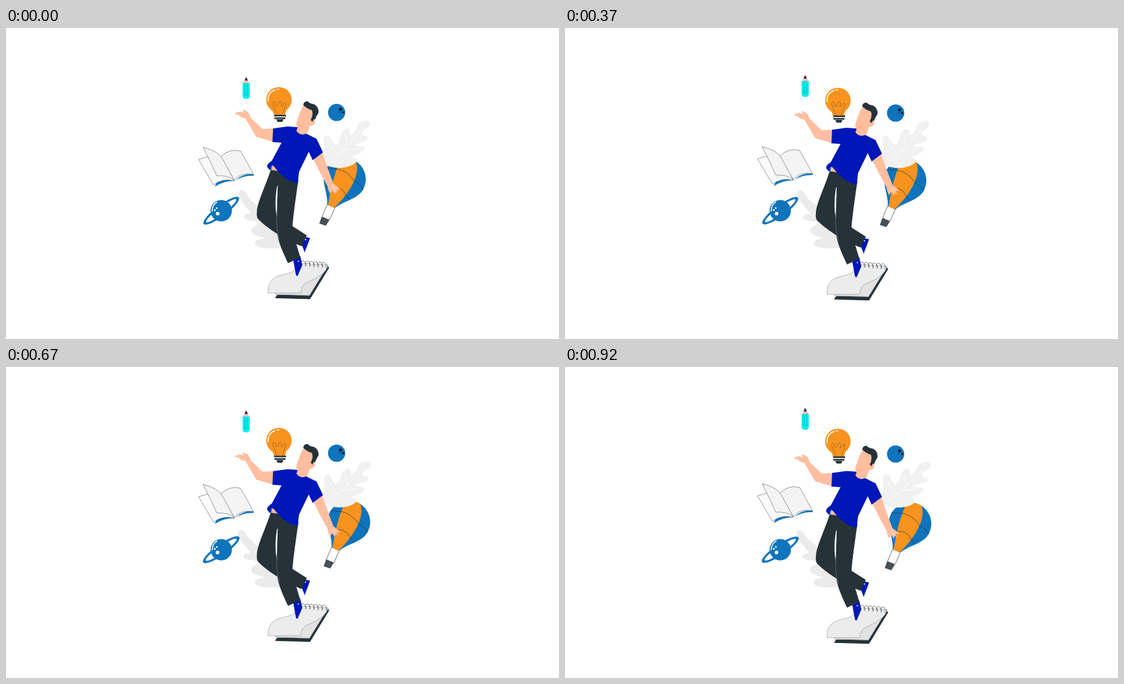
An HTML page that plays this animation: 853 px wide and 480 px high, repeating every 980 ms.

```html
<!DOCTYPE html>
<html lang="en">
<head>
<meta charset="utf-8">
<title>Juggling ideas</title>
<style>
  html, body { margin: 0; width: 100%; height: 100%; overflow: hidden; background: #fff; }
  svg { display: block; width: 100vw; height: 100vh; }
  .ink { fill: #263238; }
  .royal { fill: #0017b8; }
  .blue { fill: #0f74bc; }
  .orange { fill: #f7931e; }
  .skin { fill: #ffbe9f; }
  .leaf { fill: #ebebeb; }
  .pale { fill: #f1f1f1; }
  .page { fill: #f4f4f4; stroke: #555e63; stroke-width: .6; }
  .sheet { fill: #ececec; stroke: #8b9195; stroke-width: .6; }
  .line { fill: none; stroke: #263238; stroke-width: .6; }
  .shine { fill: none; stroke: #fff; stroke-width: 1.5; stroke-linecap: round; }
</style>
</head>
<body>
<svg viewBox="0 0 853 480">
  <g id="balloon"><g transform="translate(522 233.5) rotate(27)">
    <path class="blue" d="M-33 0A33 33 0 0 1 33 0C33 18 13 31 7 46.500L-6 47C-12 31-33 18-33 0Z"/>
    <path class="orange" d="M3-33C18-20 18 12 6 46.500L-4.500 47C-9 30-18 8-19-27A33 33 0 0 1 3-33Z"/>
    <path class="line" d="M-33-2Q-8-18 15-4Q25-5 33 1M-20 24Q0 9 12 20L20 24"/>
    <path class="line" d="M-6 47L-4.500 67M7 46.500L8 66"/>
    <path d="M-5 67L8 66L7 77L-3.500 78.500Z" fill="#455057"/>
  </g></g>

  <g id="bigLeaf">
    <path class="pale" d="M493 209C489 198 491 190 491 181C488 173 490 165 496 166C502 167 502 179 509 180C518 178 514 160 523 156C530 153 532 160 531 165C540 164 539 151 546 146C554 141 563 142 561 149C558 155 550 157 549 163C551 168 559 165 558 170C557 176 545 176 537 181C541 185 554 180 553 186C551 194 538 195 534 199C538 202 544 200 541 206C535 214 516 218 505 215C499 214 495 213 493 209Z"/>
    <path d="M501 207Q527 183 554 150M512 196L498 177M526 181L523 163M518 190L547 185" fill="none" stroke="#fff" stroke-width=".8"/>
  </g>

  <path id="smallLeaf" class="leaf" d="M359 254C361 247 369 251 372 258C376 267 385 269 390 277L425 312V339C406 342 386 339 384 333C383 326 394 326 399 324C389 322 375 317 379 310C382 305 389 305 390 299C380 297 366 297 367 291C369 286 376 288 378 285C372 277 358 265 359 254Z"/>

  <g id="notebook">
    <path class="ink" d="M496 367L498.500 370L469 418.500L415 417L418 412L466 412Z"/>
    <path class="sheet" d="M460 364L497 366L468 413L415 411L418 408Z" style="fill:#e2e2e2"/>
    <path class="sheet" d="M448 367C447 381 424 378 412 387Q404 394 404 409H455Q454 396 468 391Q493 381 497 366L457 363Z"/>
    <path id="rings" class="line"/>
  </g>

  <g id="man">
    <path class="skin" d="M413 155L396 156L377 138Q375 129 370 128L366 126Q364 128 368 131L361 129L354 131Q352 134 359 134Q362 139 369 139L386 168L413 176Z"/>
    <path class="skin" d="M473 200L488 192L496 216L505 240L514 247Q518 251 510 249L513 255L508 252L508 257L503 251L500 256Q496 248 496 244L484 222Z"/>
    <path d="M502 244L508 252M504 243L510 249" fill="none" stroke="#fff" stroke-width=".5"/>
    <path class="royal" d="M456 334L459 322L469 324L461 347Z"/>
    <path d="M469 325L468 332L462 348L461 345Z" fill="#eee"/>
    <path class="royal" d="M442 352H454L457 366L451 380Q449 386 447 380Z"/>
    <path class="ink" d="M409 217C400 245 387 270 387 284Q386 293 390 296C405 311 432 327 456 337L464 320L442 306L418 292C415 280 415 262 418 245L430 228Z"/>
    <path class="ink" d="M410 217L451 234C447 262 443 290 442 305C443 320 450 340 454 354L435 363C427 345 419 330 418 312C417 290 418 255 420 235Z"/>
    <path d="M418.500 248Q415 268 418 288Z" fill="#fff"/>
    <path d="M418 288Q416 310 422 326" fill="none" stroke="#8b9398" stroke-width=".5"/>
    <circle cx="451" cy="360" r="1" fill="#fff"/><circle cx="462" cy="326.500" r="1" fill="#fff"/>
    <path class="blue" d="M408 206Q401 212 406 219L412 220L414 211Z"/>
    <path class="skin" d="M411 212L421 221L409 219Z"/>
    <path class="royal" d="M412 155L434 152L449 153L463 163L479 171L489 192L473 204L467 191L452 222L450 240C440 238 428 231 420 222L412 212Q406 211 409 219Q400 216 404 210L410 205L425 177L411 176Z"/>
    <path class="skin" d="M461 118C455 122 452 136 448 146Q447 151 450 153L448 159Q455 168 465 162L469 151Q475 151 477 145Q478 139 473 141L472 125Z"/>
    <path d="M452 151Q456 153 459 150" fill="none" stroke="#e88f72" stroke-width=".7"/>
    <path class="ink" d="M458.500 119Q459 113 465 113Q469 117 475 117.500Q483 122 482 131Q478 137 477 141Q474 140 473 145L470 142Q474 135 472 127Q465 125 458.500 119Z"/>
  </g>

  <g id="book">
    <path class="blue" d="M322 245L325 238Q342 231 353 236Q335 236 322 245ZM353 236Q365 224 382 225L382 228Q366 227 353 236Z"/>
    <path class="page" d="M297 203L313 198L334 203L352 236Q335 231 320 242Z" style="fill:#fafafa"/>
    <path class="page" d="M331 199Q345 185 362 190L382 226Q362 222 352 235Z"/>
    <path class="page" d="M304 184Q328 190 334 202L352 235Q343 227 325 228Q316 207 304 184Z"/>
  </g>

  <g id="planet">
    <path class="blue" fill-rule="evenodd" transform="translate(332 282) rotate(-37)"
      d="M-34 0A34 8.500 0 0 1 34 0A34 8.500 0 0 1-34 0ZM-29 0A29 5 0 0 0 29 0A29 5 0 0 0-29 0Z"/>
    <circle class="blue" cx="332" cy="282" r="16.500"/>
    <path class="shine" d="M318 283Q318 273 325 269"/>
    <g fill="#fff"><circle cx="326.500" cy="286.500" r="2.800"/><circle cx="322" cy="281" r="1.500"/><circle cx="325" cy="278" r="1.300"/></g>
  </g>

  <g id="ball">
    <circle class="blue" cx="510" cy="130.300" r="13.300"/>
    <g fill="#0c1626"><circle cx="516" cy="125.500" r="2.400"/><circle cx="520" cy="130.300" r="1.800"/><circle cx="515" cy="130" r=".8"/></g>
  </g>

  <g id="bulb">
    <path class="orange" d="M413 134Q413 129 409 126.500A19.700 19.700 0 1 1 433 126.500Q431 129 431 134Z"/>
    <path class="shine" d="M404.500 113Q403 100 415 95.500M418 94.500L421 94.500"/>
    <path d="M418 134L412 119C409 112 417 112 416 118C416 122 421 120 421 115C423 109 427 117 424 120C426 121 429 118 430 115Q434 116 431 120L426 134" fill="none" stroke="#6b4a22" stroke-width=".5"/>
    <path class="ink" d="M413.500 134H432V136.500H413.500ZM414 138H431V140.500H414ZM417 141H428L426 145H419Z"/>
  </g>

  <g id="pencil">
    <path class="skin" d="M365 86L370.500 76L376 86Z"/>
    <path d="M368 81L370.500 75.500L373 81Z" fill="#1a1080"/>
    <path d="M365 85H376V104.500Q376 109.500 370.500 109.500T365 104.500Z" fill="#00f0ee"/>
    <path d="M368.500 86V101M372.500 86V101M366 102H375M368 104H373" fill="none" stroke="#078e9d" stroke-width=".5"/>
  </g>
</svg>
<script>
const LOOP = 980;

// Full travel of each part: [dx, dy, degrees, pivot x, pivot y]
const travel = {
  balloon: [10, 8.5],
  bigLeaf: [0, 0, 4, 500, 185],
  smallLeaf: [0, 0, -1.4, 420, 338],
  notebook: [0, 8.7],
  man: [0, 8.5],
  book: [0, -4],
  planet: [0, 0, 3, 332, 282],
  ball: [0, 4],
  bulb: [0, 4],
  pencil: [0, -12.5],
};

let rings = "";
for (let i = 0; i < 6; i++) {
  rings += `M${457 + i * 6.4} ${366 + i * .5}q-4 -6 1 -7q5 1 4 9`;
}
document.getElementById("rings").setAttribute("d", rings);

// Poses change every 60 ms, with a longer hold at 0 and 730 ms.
function poseAt(t) {
  if (t < 130) return 0;
  if (t < 730) return 1 + Math.floor((t - 130) / 60);
  return t < 860 ? 11 : t < 920 ? 12 : 13;
}

function draw() {
  const p = (poseAt(performance.now() % LOOP) / 13) ** 1.5;
  for (const [id, [dx, dy, turn = 0, cx = 0, cy = 0]] of Object.entries(travel)) {
    document.getElementById(id).setAttribute("transform",
      `translate(${dx * p} ${dy * p}) rotate(${turn * p} ${cx} ${cy})`);
  }
  requestAnimationFrame(draw);
}
draw();
</script>
</body>
</html>
```
